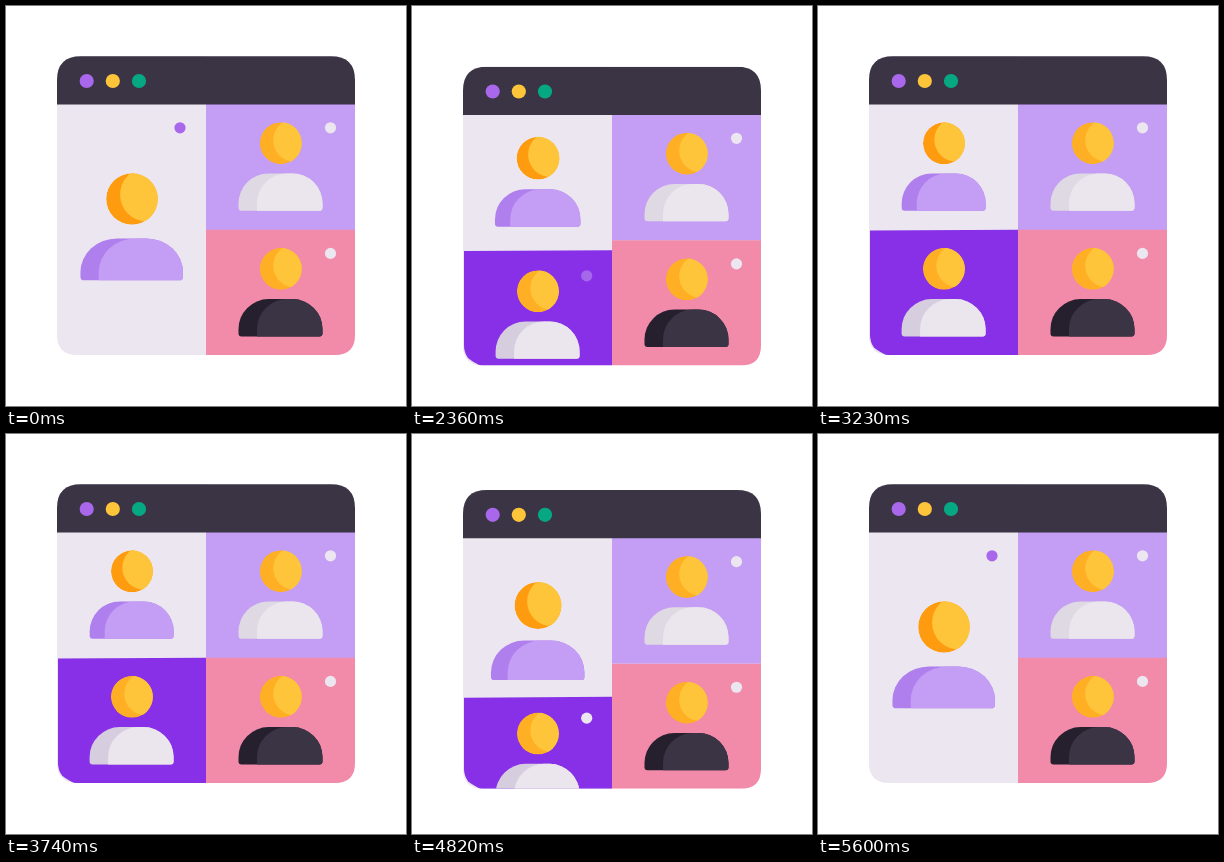
Write an HTML page that moves like this. It is 400 px wide and 400 px high and loops after 5630 ms.

```html
<!DOCTYPE html>
<html lang="en">
<head>
<meta charset="utf-8">
<style>
  html, body { margin: 0; height: 100%; overflow: hidden; background: #fff; }
  svg { display: block; width: 100vw; height: 100vh; }
</style>
</head>
<body>
<svg viewBox="0 0 400 400">
  <defs>
    <clipPath id="frame">
      <path d="M51 74Q51 50.2 75 50.2H325Q349 50.2 349 74V329Q349 349 329 349H71Q51 349 51 329Z"/>
    </clipPath>
    <clipPath id="corner">
      <path d="M52 90H200V350H70Q60 345 56 341.5Q52 336 52 329Z"/>
    </clipPath>
    <clipPath id="face"><circle r="21"/></clipPath>
  </defs>
  <g id="win">
    <g clip-path="url(#frame)">
      <path fill="#ebe6ef" d="M51 50H200V350H51Z"/>
      <path fill="#c49df4" d="M200 98H350V224H200Z"/>
      <path fill="#f28aa9" d="M200 223.8H350V350H200Z"/>
      <path fill="#3a3445" d="M51 50H350V98.4H51Z"/>
      <circle cx="80.7" cy="75" r="7.1" fill="#a967ec"/>
      <circle cx="106.8" cy="75" r="7.1" fill="#ffc53a"/>
      <circle cx="133" cy="75" r="7.1" fill="#06a884"/>
      <circle cx="324.5" cy="121.8" r="5.6" fill="#ebe6ef"/>
      <circle cx="324.5" cy="247.4" r="5.6" fill="#ebe6ef"/>
      <circle id="hostDot" cx="174" cy="121.8" r="5.6" fill="#a967ec"/>
      <g id="people"></g>
      <g clip-path="url(#corner)">
        <path id="panel" fill="#8730e7" d="M51 224.6L200 223.8V352H51Z"/>
        <g id="guest">
          <circle id="guestDot" cx="174.7" cy="247.4" r="5.6" fill="#ebe6ef"/>
        </g>
      </g>
    </g>
  </g>
</svg>
<script>
const $ = id => document.getElementById(id);
const LOOP = 5630, HOLD = 2000, STEP = 30, CLOSE = 90;

const torso = (left, corner) =>
  `M${left + corner} 37.3Q${left} 37.3 ${left} ${37.3 - corner}V30A30 30 0 0 1 ${left + 30} 0` +
  'H12A30 30 0 0 1 42 30V34.3Q42 37.3 39 37.3Z';

function addPerson(parent, x, y, dark, light, skin = '#ffaf24', lit = [14, -3, 21.6], fold = -23.5) {
  parent.insertAdjacentHTML('beforeend', `<g>
    <g transform="translate(${x} ${y})" clip-path="url(#face)">
      <circle r="21" fill="${skin}"/>
      <circle cx="${lit[0]}" cy="${lit[1]}" r="${lit[2]}" fill="#ffc53a"/>
    </g>
    <g transform="translate(${x - .3} ${y + 30.3})">
      <path d="${torso(-42, 3)}" fill="${dark}"/>
      <path d="${torso(fold, 0)}" fill="${light}"/>
    </g></g>`);
  return parent.lastElementChild.children;
}

addPerson($('people'), 274.8, 137.2, '#dfd9e3', '#ebe6ee');
addPerson($('people'), 274.8, 262.8, '#251f2e', '#3a3445');
addPerson($('guest'), 125.9, 262.8, '#d6cedf', '#ebe6ee');
const [head, body] = addPerson($('people'), 126, 137.2, '#b07fee', '#c49df4',
  '#ff9b0f', [12.3, -3.6, 22], -27);

const clamp = v => Math.min(1, Math.max(0, v));
const mix = (a, b, p) => a + (b - a) * p;
const fade = (f, from, to) => clamp((f - from) / (to - from));
const ease = (f, a, b) => 1 - Math.exp(-a * f - b * f ** 3);

// Quick dip of the window, then a long soft return.
function dip(f, size) {
  if (f <= 0 || f >= 30) return 0;
  const shape = f < 9 ? (1 - Math.cos(Math.PI * f / 9)) / 2 : 1 / Math.cosh((f - 9) / 4.6);
  return size * shape * fade(f, 30, 24);
}

// How far the fourth panel is open, 0 to 1.
const opened = (f, a, b, a2 = a, b2 = b) =>
  f < CLOSE ? ease(f, a, b) : 1 - ease(f - CLOSE, a2, b2);

const moveY = (id, y) => $(id).setAttribute('transform', `translate(0 ${y})`);

function draw(f) {
  moveY('win', dip(f, 12.8) + dip(f - 60, 3.4) + dip(f - CLOSE, 14.1));
  moveY('panel', 125.6 * (1 - opened(f, .06, .00105)));
  moveY('guest', 125.6 * (1 - opened(f, .055, .00098)));

  const p = opened(f, .06, .00105, .14, .0024);
  head.setAttribute('transform', `translate(126 ${mix(193, 137.3, p)}) scale(${mix(1.23, 1, p)})`);
  body.setAttribute('transform',
    `translate(125.7 ${mix(232.5, 167.5, p)}) scale(${mix(1.22, 1, p)} ${mix(1.12, 1, p)})`);

  $('hostDot').setAttribute('opacity', 1 - fade(f, 1, 11) + fade(f, 100, 110));
  $('guestDot').setAttribute('opacity', 1 - fade(f, 5, 15) + fade(f, CLOSE, 94));
}

function tick() {
  const t = performance.now() % LOOP;
  draw(Math.max(0, Math.floor((t - HOLD) / STEP)));
  requestAnimationFrame(tick);
}
tick();
</script>
</body>
</html>
```
